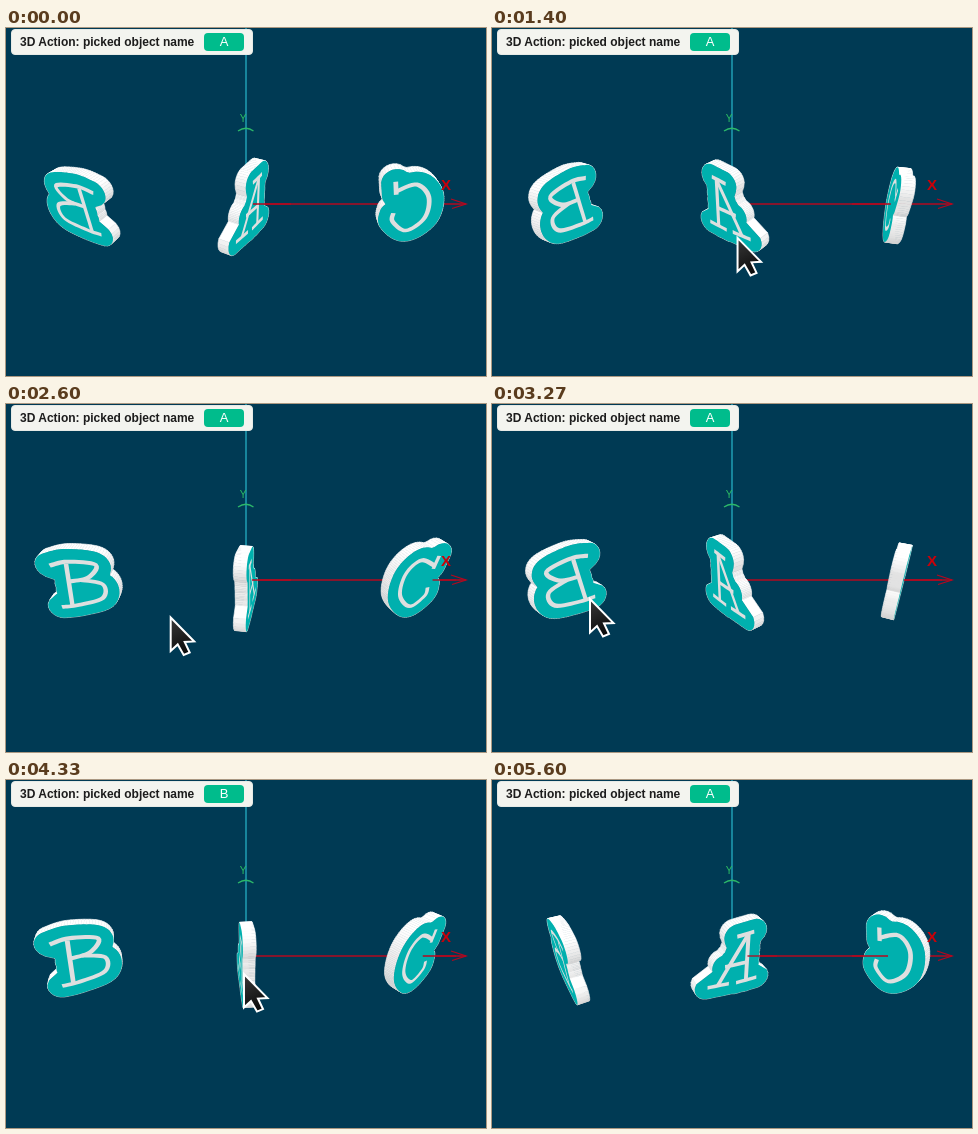
These frames come from a looping animation (480 px wide and 348 px high, 5670 ms). An HTML page with a canvas:

```html
<!DOCTYPE html>
<html lang="en">
<head>
<meta charset="utf-8">
<title>3D picking</title>
<style>
html, body { margin: 0; width: 100%; height: 100%; overflow: hidden; background: #003a54; }
canvas { position: absolute; left: 0; top: 0; }
#panel {
  position: absolute; left: 5px; top: 1px; width: 242px; height: 26px; box-sizing: border-box;
  border: 1px solid #e6eae6; border-radius: 4px; background: #f3f4ef; color: #1c1c1c;
  font: bold 12px/24px "Liberation Sans", Arial, sans-serif; padding-left: 8px; white-space: nowrap;
}
#name {
  position: absolute; left: 192px; top: 3px; width: 40px; height: 18px; border-radius: 4px;
  background: #00bc8c; color: #fff; text-align: center; font-weight: normal; font-size: 13px; line-height: 18px;
}
</style>
</head>
<body>
<canvas id="view" width="480" height="348"></canvas>
<div id="panel">3D Action: picked object name<span id="name">A</span></div>
<script>
const ctx = document.getElementById('view').getContext('2d');
const nameBox = document.getElementById('name');
const LOOP = 5670, FRAMES = 85, SPEED = 199.2;      // ms, frames, degrees per second
const DIST = 411, SIN = 0.507, COS = 0.862;         // camera distance and pitch
const HALF = 6, MARGIN = 13.5, PEN = 4.4;           // half thickness, rim around the glyph, stroke width
const WALLS = 96;

// Pen strokes of each glyph, as a few points on its face
const letters = [
  { x: -165, angle: 160, strokes: [
    [[-8, 22], [-12, -26]],
    [[-24, 20], [-6, 24], [20, 20], [10, 6], [-9, 2]],
    [[2, 3.5], [23, -2], [20, -18], [-6, -26], [-23, -28]]] },
  { x: 0, angle: 59, strokes: [
    [[3, 24], [21, 26]], [[15, 25], [-18, -27]], [[15, 25], [13, -29]],
    [[-29, -27], [-6, -28]], [[2, -29], [25, -28]], [[-10, -7], [13, -7]]] },
  { x: 165, angle: 174.4, strokes: [
    [[21, 27], [18, 13]],
    [[18, 17], [1, 25], [-13, 12], [-14, -12], [1, -28], [16, -18], [17, -8]]] }
];

// Pointer path: time, x, y
const path = [[440, 205, 28], [800, 211, 122], [1600, 257, 239], [2050, 257, 239], [3000, 98, 195],
  [3660, 98, 195], [3870, 142, 115], [4130, 226, 230], [4330, 238, 193], [4620, 237, 245],
  [4800, 236, 245], [5000, 236, 227], [5340, 228, 99]];
const arrow = [[0, 0], [0, 33.5], [7, 27], [13, 37.5], [19, 35], [14, 24.5], [23.5, 24]];

// Catmull-Rom curve through the points
function smooth(points) {
  const at = i => points[Math.max(0, Math.min(points.length - 1, i))];
  const out = [];
  for (let i = 0; i < points.length - 1; i++) {
    const [a, b, c, d] = [at(i - 1), at(i), at(i + 1), at(i + 2)];
    for (let t = 0; t < 1; t += 0.125) {
      out.push([0, 1].map(j => {
        const bend = 2 * a[j] - 5 * b[j] + 4 * c[j] - d[j];
        const twist = 3 * (b[j] - c[j]) + d[j] - a[j];
        return b[j] + t / 2 * (c[j] - a[j] + t * (bend + t * twist));
      }));
    }
  }
  return [...out, at(points.length)];
}

// A curve widened to a band
function ribbon(curve) {
  const left = [], right = [];
  curve.forEach(([x, y], i) => {
    const a = curve[Math.max(0, i - 1)], b = curve[Math.min(curve.length - 1, i + 1)];
    const dx = b[0] - a[0], dy = b[1] - a[1], k = PEN / 2 / Math.hypot(dx, dy);
    left.push([x - dy * k, y + dx * k]);
    right.unshift([x + dy * k, y - dx * k]);
  });
  return [...left, ...right];
}

// Clockwise rim: farthest point on each ray within MARGIN of any stroke
function rim(curves) {
  return Array.from({ length: WALLS }, (_, i) => {
    const a = -i / WALLS * 2 * Math.PI, c = Math.cos(a), s = Math.sin(a);
    let r = 0;
    for (const [x, y] of curves.flat()) {
      const off = x * s - y * c;
      if (Math.abs(off) < MARGIN) r = Math.max(r, x * c + y * s + Math.sqrt(MARGIN ** 2 - off ** 2));
    }
    return [r * c, r * s];
  });
}

for (const l of letters) {
  const curves = l.strokes.map(smooth);
  l.rim = rim(curves);
  l.ribbons = curves.map(ribbon);
}

function project(x, y, z) {
  const depth = DIST + z * COS - y * SIN;
  return [240 + DIST * x / depth, 176 - DIST * (y * COS + z * SIN) / depth, depth];
}

function trace(points) {
  ctx.beginPath();
  points.forEach(p => ctx.lineTo(p[0], p[1]));
}

function fill(points, color) {
  trace(points);
  ctx.closePath();
  ctx.fillStyle = color;
  ctx.fill();
}

function stroke(color, width) {
  ctx.strokeStyle = color;
  ctx.lineWidth = width;
  ctx.stroke();
}

function line(points, color, width = 1.3) {
  trace(points);
  stroke(color, width);
}

const xAxis = (from, to) => line([[240 + from, 176], [240 + to, 176]], '#b3081f');

function drawLetter(l, time) {
  const a = (l.angle - SPEED * time / 1000) * Math.PI / 180, c = Math.cos(a), s = Math.sin(a);
  const place = (u, v, n) => project(l.x + u * c + n * s, v, u * s - n * c);
  const eye = DIST * COS * c - l.x * s, side = Math.sign(eye);

  const walls = l.rim.map((p, i) => {
    const q = l.rim[(i + 1) % WALLS];
    const quad = [place(...p, -HALF), place(...q, -HALF), place(...q, HALF), place(...p, HALF)];
    const up = (q[0] - p[0]) / Math.hypot(q[0] - p[0], q[1] - p[1]);
    return { quad, up, depth: quad.reduce((sum, k) => sum + k[2], 0) };
  }).sort((m, n) => n.depth - m.depth);
  for (const { quad, up } of walls) {
    const g = Math.round(Math.min(255, 232 + 28 * up)), color = `rgb(${g},${g},${g})`;
    fill(quad, color);
    stroke(color, 0.6);
  }

  if (Math.abs(eye) > HALF) {
    const face = points => points.map(p => place(...p, side * HALF));
    fill(face(l.rim), '#00b0ae');
    l.ribbons.forEach(r => fill(face(r), '#dedfdf'));
  }

  // The part of the axis that comes out through the visible face
  const out = HALF / (side * s), reach = 45;
  if (Math.abs(out) < reach) {
    const from = Math.max(0, l.x + (out > 0 ? out : -reach));
    const to = l.x + (out > 0 ? reach : out);
    if (to > from) xAxis(from, to);
  }
}

function label(text, x, y, font, color) {
  ctx.font = font + ' "Liberation Sans", Arial, sans-serif';
  ctx.fillStyle = color;
  ctx.textAlign = 'center';
  ctx.textBaseline = 'middle';
  ctx.fillText(text, x, y);
}

function drawPointer(time) {
  const i = path.findIndex(k => k[0] > time);
  if (i < 1) return;
  const [t0, x0, y0] = path[i - 1], [t1, x1, y1] = path[i], k = (time - t0) / (t1 - t0);
  ctx.save();
  ctx.translate(x0 + (x1 - x0) * k, y0 + (y1 - y0) * k);
  const shade = ctx.createLinearGradient(0, 0, 16, 34);
  shade.addColorStop(0, '#3a3a3a');
  shade.addColorStop(1, '#0c0c0c');
  fill(arrow, shade);
  stroke('#fff', 2);
  ctx.restore();
}

function draw(time) {
  ctx.fillStyle = '#003a54';
  ctx.fillRect(0, 0, 480, 348);
  line([[240, 0], [240, 176]], '#1f9fb4', 1.5);
  ctx.beginPath();
  ctx.moveTo(232, 103);
  ctx.quadraticCurveTo(240, 97.5, 247.5, 103);
  stroke('#2cb86a', 1.3);
  xAxis(0, 220);
  line([[445, 171], [460, 176], [446, 180.5]], '#b3081f');
  letters.forEach(l => drawLetter(l, time));
  label('Y', 237, 91.5, '10px', '#2cc063');
  label('X', 440, 157.5, 'bold 15px', '#cc0008');
  drawPointer(time);
  nameBox.textContent = time > 3330 && time < 4390 ? 'B' : 'A';
}

function tick() {
  const frame = Math.floor((performance.now() % LOOP + 7) * FRAMES / LOOP) % FRAMES;
  draw(frame * LOOP / FRAMES);
  requestAnimationFrame(tick);
}
tick();
</script>
</body>
</html>
```
